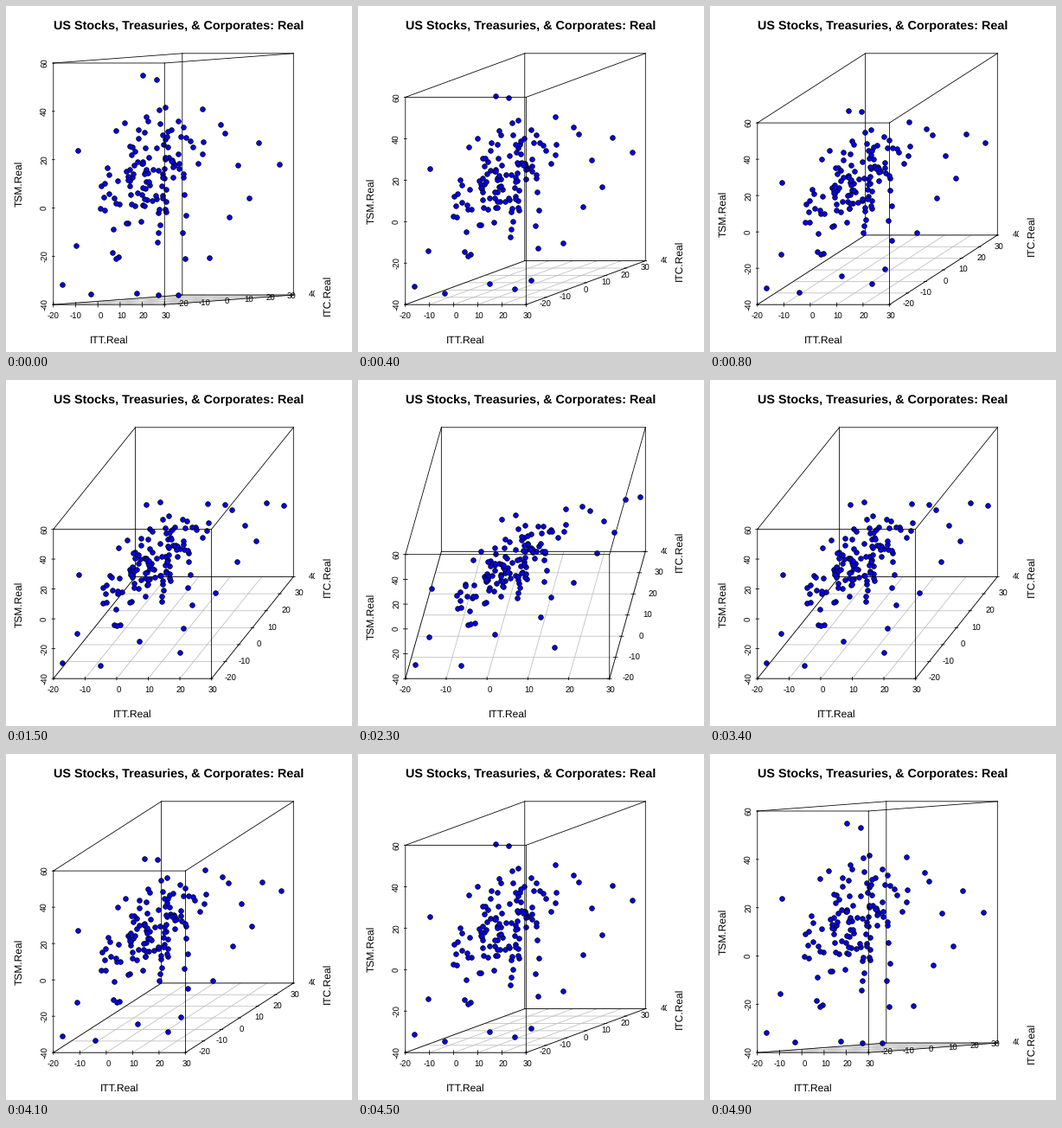
A matplotlib script that plays this animation: 400 by 400 pixels, repeating every 5 s.

```python
import numpy as np
import matplotlib.pyplot as plt
from matplotlib.animation import FuncAnimation
from matplotlib.patches import Rectangle

FRAMES, INTERVAL = 50, 100
PX = 0.72  # points per pixel at 100 dpi
LEFT, RIGHT, TOP, BOTTOM = 54.8, 332.3, 54.8, 345.2
NX, NY, NZ = 5, 6, 5  # tick intervals along each axis
THIN = dict(lw=0.8 * PX, snap=False)

plt.rcParams["font.family"] = "Liberation Sans"
plt.rcParams["text.hinting"] = "none"

# Extreme years as (ITT, ITC, TSM)
EXTREMES = [
    (-18, -18, -32), (-7, -16, -36), (-1, -1, -36.5), (14.5, -7, -37),
    (9, 8, -38), (11.5, 8.5, -23), (16, 15.5, -23), (21, 19.5, -6.5),
    (24.5, 25, 1), (29.5, 34, 14.5), (27, 27, 24), (22.5, 22, 15),
    (19.5, 19, 28.5), (17.5, 19, 32), (0.5, 0.5, 53.5), (3.5, 3.5, 51.5),
    (-14.5, -14.5, 23.5), (-15, -14.5, -16),
]


def make_data(n=122, seed=11):
    """Typical years: both bond returns move together, stocks loosely follow."""
    rng = np.random.default_rng(seed)
    a, b, c = rng.standard_normal((3, n)).clip(-2.1, 2.1)
    itt = 2 + 5.8 * a
    itc = itt + 0.8 * b
    tsm = 10.5 + 0.6 * (itt - 2) + 13 * c
    points = np.vstack([np.column_stack([itt, itc, tsm]), EXTREMES])
    # Measure in tick intervals from the front lower left corner
    return ((points + (20, 20, 40)) / (10, 10, 20)).T


DATA = make_data()

fig = plt.figure(figsize=(4, 4), dpi=100, facecolor="white")
ax = fig.add_axes([0, 0, 1, 1])


def label(x, y, s, size, **kw):
    kw = {"ha": "center", "va": "baseline", "rotation_mode": "anchor", **kw}
    return ax.text(x, y, s, fontsize=size * PX, **kw)


def padding(s):
    """Width of the blanks that right-align a label to three characters."""
    return 2.67 * (3 - len(s))


def draw(k):
    ax.clear()
    ax.set(xlim=(0, 400), ylim=(400, 0))
    ax.axis("off")

    angle = 3 + 77 * min(k, FRAMES - 1 - k) / 24
    lift = angle / 90
    skew = 1 - lift
    ux = (RIGHT - LEFT) / (NX + NY * skew)
    uz = (BOTTOM - TOP) / (NZ + NY * lift)

    def project(x, y, z):
        return LEFT + ux * (x + skew * y), BOTTOM - uz * (z + lift * y)

    def line(a, b, color="black", z=2):
        (x0, y0), (x1, y1) = project(*a), project(*b)
        ax.plot([x0, x1], [y0, y1], color=color, zorder=z, **THIN)

    def tick(x, y, dx, dy):
        ax.plot([x - dx, x + dx], [y - dy, y + dy], "k", zorder=2, **THIN)

    # Floor grid
    for i in range(NX + 1):
        line((i, 0, 0), (i, NY, 0), "#bebebe", 1)
    for j in range(NY + 1):
        line((0, j, 0), (NX, j, 0), "#bebebe", 1)

    # Box, with its front face over the points
    for y, order in ((NY, 2), (0, 4)):
        for z in (0, NZ):
            line((0, y, z), (NX, y, z), z=order)
        for x in (0, NX):
            line((x, y, 0), (x, y, NZ), z=order)
    for x in (0, NX):
        for z in (0, NZ):
            line((x, 0, z), (x, NY, z))

    ax.plot(*project(*DATA), "o", ms=5.6 * PX, mfc="blue", mec="black",
            mew=0.8 * PX, snap=False, zorder=3)

    tick_x, tick_z = 0.01 * NX * ux, 0.01 * NZ * uz
    for i in range(NX + 1):
        x, y = project(i, 0, 0)
        tick(x, y, 0, tick_z)
        s = str(10 * i - 20)
        label(x + padding(s) / 2, 362, s, 9.6)
    for i in range(NZ + 1):
        x, y = project(0, 0, i)
        tick(x, y, tick_x, 0)
        label(48, y, str(20 * i - 40), 9.6, rotation=90)
    clip = Rectangle((0, 0), 356.8, 400, transform=ax.transData)
    for j in range(NY + 1):
        x, y = project(NX, j, 0)
        tick(x, y, tick_x, 0)
        s = str(10 * j - 20)
        text = label(x + 14.8 + padding(s), y + 3.2, s, 9.6, ha="left",
                     clip_on=True)
        text.set_clip_path(clip)

    label(200, 27, "US Stocks, Treasuries, & Corporates: Real", 14.4,
          weight="bold")
    label(LEFT + NX * ux / 2, 390, "ITT.Real", 12)
    label(19, BOTTOM - NZ * uz / 2, "TSM.Real", 12, rotation=90)
    label(375, project(NX, NY, 0)[1], "ITC.Real", 12, rotation=90)
    return []


anim = FuncAnimation(fig, draw, frames=FRAMES, init_func=lambda: [],
                     interval=INTERVAL, repeat=True, repeat_delay=0)
plt.show()
```
